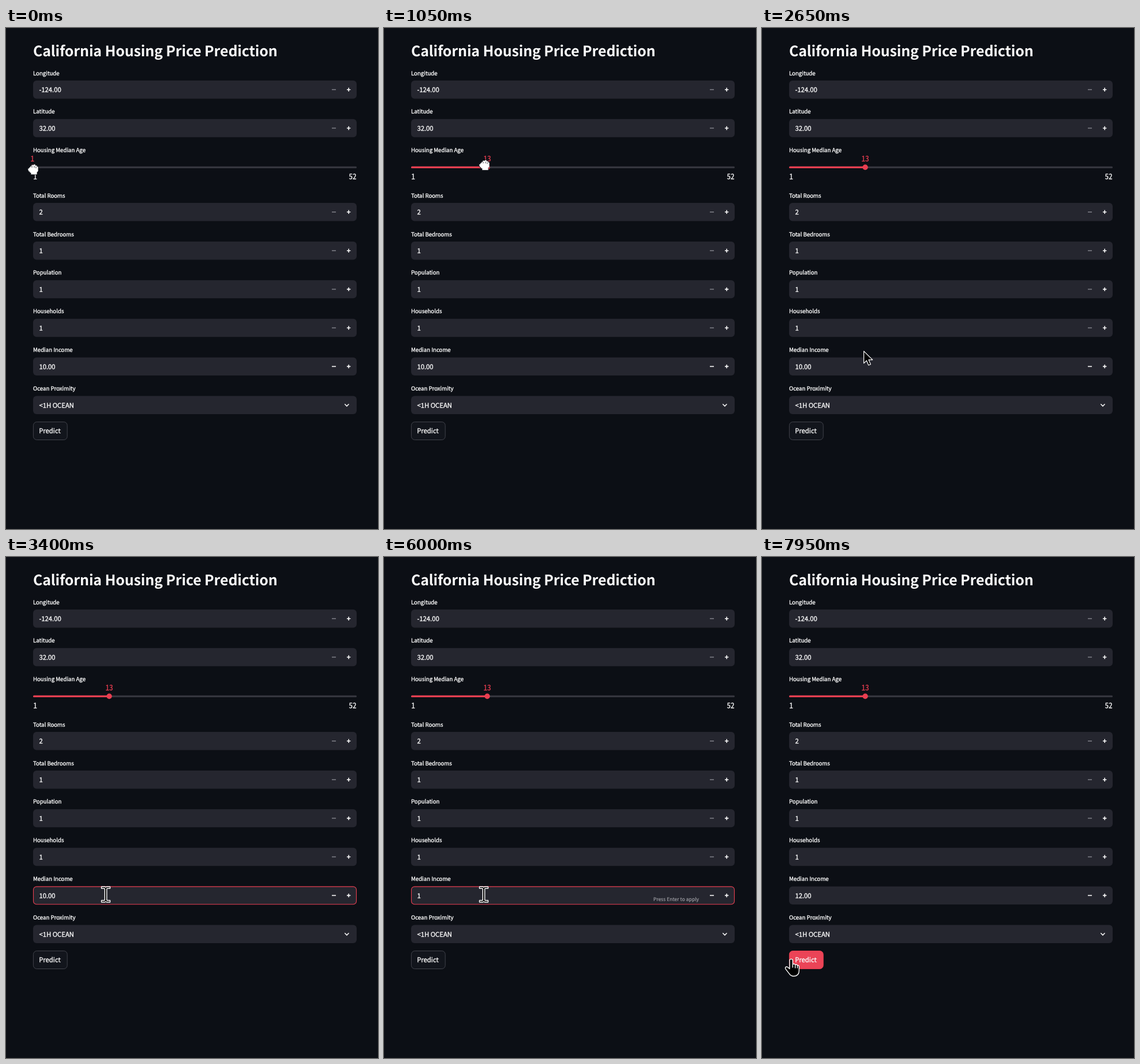
An HTML page that plays this animation: 645x868 px, repeating every 8000 ms.

```html
<!DOCTYPE html>
<html lang="en">
<head>
<meta charset="utf-8">
<title>Housing price form</title>
<style>
  html, body { margin: 0; width: 100%; height: 100%; overflow: hidden; background: #0c0f15; }
  svg { display: block; width: 100vw; height: 100vh; }
  text {
    font-family: "Noto Sans CJK JP", "Noto Sans CJK SC", "Noto Sans", sans-serif;
    font-weight: 500; color: #fafafa; fill: currentColor; stroke: currentColor; stroke-width: 0;
    text-rendering: geometricPrecision; white-space: pre;
  }
  .title { font-size: 24.93px; font-weight: 700; letter-spacing: -.005em; }
  .label { font-size: 9.65px; stroke-width: .35px; }
  .value { font-size: 11.3px; stroke-width: .35px; }
  .hint { font-size: 8.55px; font-weight: 400; color: #a3a3a9; stroke-width: .15px; }
  .tick { font: 500 13.2px "Noto Sans Mono CJK JP", "Noto Sans Mono", monospace; stroke-width: .25px; }
</style>
</head>
<body>
<svg id="stage" viewBox="0 0 645 868"></svg>
<script>
const LOOP = 8000, LEFT = 47, WIDTH = 561, BOX_H = 31.4;
const RED = '#e83e50', WHITE = '#fafafa', DIM = '#7c7d85', PANEL = '#25262f';
const stage = document.getElementById('stage');

function add(tag, attrs, parent = stage) {
  const el = document.createElementNS('http://www.w3.org/2000/svg', tag);
  set(el, attrs);
  parent.appendChild(el);
  return el;
}
function set(el, attrs) {
  for (const key in attrs) el.setAttribute(key, attrs[key]);
}
function write(str, x, y, cls, attrs = {}) {
  const el = add('text', { x, y, class: cls, ...attrs });
  el.textContent = str;
  return el;
}
const show = (el, on) => set(el, { visibility: on ? 'visible' : 'hidden' });

// Each field: label, value, top of box, and whether minus is enabled
const fields = [
  ['Longitude', '-124.00', 91],
  ['Latitude', '32.00', 157.8],
  ['Total Rooms', '2', 303.1],
  ['Total Bedrooms', '1', 370],
  ['Population', '1', 436.9],
  ['Households', '1', 503.8],
  ['Median Income', '10.00', 570.7, true],
  ['Ocean Proximity', '<1H OCEAN', 637.6]
];

function field([label, value, top, canLower]) {
  const mid = top + BOX_H / 2;
  write(label, LEFT, top - 9.5, 'label');
  add('rect', { x: LEFT, y: top, width: WIDTH, height: BOX_H, rx: 6, fill: PANEL });
  const text = write(value, 57.4, mid + 4.2, 'value');
  if (label === 'Ocean Proximity') {
    add('path', { d: `M587.3 ${mid - 1.8}l3.6 3.6l3.6 -3.6`, fill: 'none', stroke: WHITE, 'stroke-width': 1.5 });
  } else {
    add('path', { d: `M565 ${mid}h7`, stroke: canLower ? WHITE : DIM, 'stroke-width': 1.6 });
    add('path', { d: `M591 ${mid}h6.4M594.2 ${mid - 3.2}v6.4`, stroke: WHITE, 'stroke-width': 1.6 });
  }
  return { top, text };
}

write('California Housing Price Prediction', LEFT, 49, 'title');
const inputs = fields.map(field);
const income = inputs[6];
const hint = write('Press Enter to apply', 467, 596.2, 'hint');
const focusRing = add('rect', {
  x: LEFT + .5, y: income.top + .4, width: WIDTH - 1, height: BOX_H - .8, rx: 5.5,
  fill: 'none', stroke: RED, 'stroke-width': 1.1
});

// Slider
write('Housing Median Age', LEFT, 215, 'label');
add('rect', { x: LEFT, y: 239.8, width: WIDTH, height: 3.1, rx: 1.5, fill: '#35363e' });
const filled = add('rect', { x: LEFT, y: 239.8, height: 3.1, rx: 1.5, fill: RED });
const thumb = add('circle', { cy: 241.3, r: 4.7, fill: RED });
const age = write('1', 0, 231.3, 'tick', { 'text-anchor': 'middle', style: `color:${RED}` });
write('1', LEFT + .3, 262, 'tick');
write('52', 607.6, 262, 'tick', { 'text-anchor': 'end' });

// Button
const button = add('rect', { x: 47.4, y: 682.5, width: 58.8, height: 31, rx: 6, 'stroke-width': 1 });
const caption = write('Predict', 57.2, 702, 'value');

// Pointer shapes, drawn around their own hot point
const shape = (d, fill, stroke, width) =>
  add('path', { d, fill, stroke, 'stroke-width': width, 'stroke-linejoin': 'round' });
const cursors = {
  fist: shape('M-5 -6h2v-2h4v-1h3v2h3v2h2v8l-2 2v4h-11v-3h-2v-2h-2v-2h-1v-4h2v-2h2zM-2 -6v3M2 -6v3M5 -5v3', '#fff', '#15171c', .8),
  beam: shape('M-7.5 -13.8h6l1.5 1l1.5 -1h6v3h-5l-.8 .8v19.2l.8 .8h5v3h-6l-1.5 -1l-1.5 1h-6v-3h5l.8 -.8v-19.2l-.8 -.8h-5z', '#000', '#fff', 1.4),
  arrow: shape('M0 0v21l4.8 -4.6l3.4 8l3.6 -1.6l-3.4 -7.8h6.8z', '#000', '#fff', 1.2),
  hand: shape('M-2.7 2.5Q-2.7 0 0 0Q2.7 0 2.7 2.5V9Q5.2 7.4 7 9.8Q9.6 8.6 10.8 11Q13.7 10.4 13.7 14V20Q13.7 29.6 4.5 29.6Q-.5 29.6 -3.2 25.5L-9.8 17Q-11 14 -8.2 13.4Q-6.2 13 -2.7 17ZM2.7 9v6M7 9.8v6M10.8 11v5', '#000', '#fff', 1.4)
};

const path = [
  [0, 47, 245], [350, 47, 245], [1000, 174, 237.5], [1250, 174, 237.5],
  [1800, 211.3, 312.3], [2000, 211.3, 312.3], [2800, 173, 585],
  [7200, 173, 585], [7640, 50.6, 696.6], [LOOP, 50.6, 696.6]
];
const ease = u => u * u * (3 - 2 * u);

function pointAt(t) {
  const i = path.findIndex(p => p[0] > t);
  const [t0, x0, y0] = path[i - 1], [t1, x1, y1] = path[i];
  const u = ease((t - t0) / (t1 - t0));
  return [x0 + (x1 - x0) * u, y0 + (y1 - y0) * u];
}

const overButton = (x, y) => x > 47 && x < 107 && y > 682 && y < 714;
function cursorKind(t, x, y) {
  if (t < 1250) return 'fist';
  if (overButton(x, y)) return 'hand';
  const i = fields.findIndex(f => y >= f[2] && y <= f[2] + BOX_H);
  return i < 0 ? 'arrow' : i === 7 ? 'hand' : 'beam';
}

function incomeAt(t) {
  if (t < 6000) return '10.00'.slice(0, 5 - [4250, 4400, 4550, 4700].filter(k => t >= k).length);
  return '12.00'.slice(0, 1 + [6100, 6300, 6450, 6600].filter(k => t >= k).length);
}

function draw(ms) {
  const t = Math.floor(ms % LOOP / 50) * 50;
  const [x, y] = pointAt(t);

  const value = t < 350 ? 1 : t < 1000 ? Math.min(13, 1 + Math.round((x - LEFT) / 11)) : 13;
  const knob = LEFT + WIDTH * (value - 1) / 51;
  set(filled, { width: knob - LEFT });
  set(thumb, { cx: knob });
  set(age, { x: value < 10 ? knob - 1.2 : knob });
  age.textContent = value;

  const pressed = t >= 7850;
  show(focusRing, t >= 3050 && !pressed);
  income.text.textContent = incomeAt(t);
  show(hint, t >= 4250 && !pressed);

  const hover = overButton(x, y);
  set(button, { fill: pressed ? '#eb4457' : '#12151c', stroke: hover ? RED : '#41434b' });
  caption.style.color = hover && !pressed ? RED : WHITE;

  const kind = cursorKind(t, x, y);
  for (const name in cursors) show(cursors[name], name === kind);
  set(cursors[kind], { transform: `translate(${x.toFixed(2)} ${y.toFixed(2)})` });
}

const start = performance.now();
function tick() {
  draw(performance.now() - start);
  requestAnimationFrame(tick);
}
tick();
</script>
</body>
</html>
```
